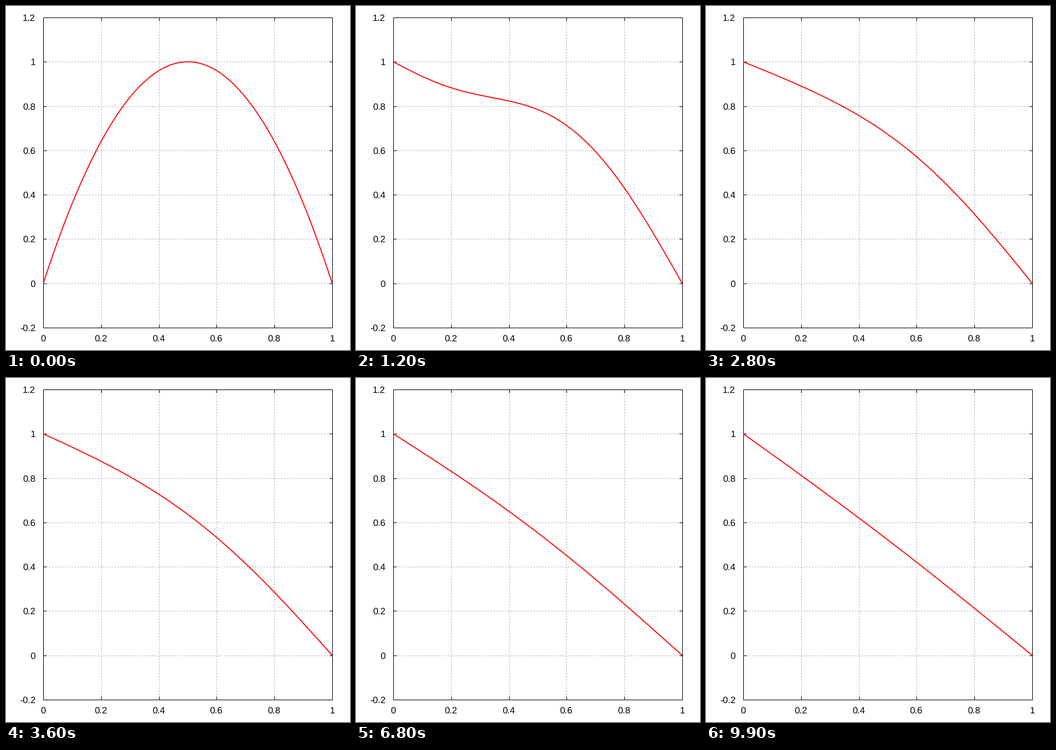
These frames come from a looping animation (600 by 600 pixels, 10 s). A matplotlib script:

```python
import numpy as np
import matplotlib.pyplot as plt
from matplotlib.animation import FuncAnimation

SIZE, DPI = 600, 100
FRAMES, INTERVAL = 100, 100
LEFT, RIGHT, TOP, BOTTOM = 65, 569, 20, 561
Y_MIN, Y_MAX = -0.2, 1.2
TICK = 5
DT = 0.003  # diffusion time per frame
PX = 72 / DPI

plt.rcParams["font.family"] = "Liberation Sans"
plt.rcParams["text.hinting"] = "none"


def to_x(v):
    return LEFT + (RIGHT - LEFT) * v


def to_y(v):
    return BOTTOM - (BOTTOM - TOP) * (v - Y_MIN) / (Y_MAX - Y_MIN)


x = np.linspace(0, 1, 101)
n = np.arange(1, 201)
# Sine series of the parabola minus the steady state 1 - x
coef = 32 * (n % 2) / (n * np.pi) ** 3 - 2 / (n * np.pi)
modes = np.sin(np.pi * np.outer(x, n))


def heat(step):
    if step == 0:
        return 4 * x * (1 - x)
    decay = np.exp(-(n * np.pi) ** 2 * DT * step)
    return 1 - x + modes @ (coef * decay)


fig = plt.figure(figsize=(SIZE / DPI, SIZE / DPI), dpi=DPI, facecolor="white")
ax = fig.add_axes([0, 0, 1, 1])
ax.set_xlim(0, SIZE)
ax.set_ylim(SIZE, 0)
ax.axis("off")


def hline(y, x0, x1, **style):
    """Fill pixels x0 to x1 of row y."""
    ax.plot([x0, x1 + 1], [y + 0.5] * 2, lw=PX, snap=False, **style)


def vline(x, y0, y1, **style):
    """Fill pixels y0 to y1 of column x."""
    ax.plot([x + 0.5] * 2, [y0, y1 + 1], lw=PX, snap=False, **style)


def label(px, py, value, ha):
    ax.text(px, py, f"{value:g}", fontsize=16 * PX, ha=ha, va="baseline")


grid = dict(color="#a0a0a0", dashes=(2, 3), dash_capstyle="butt", zorder=1)
solid = dict(color="black", solid_capstyle="butt", zorder=2)

for k in range(6):
    v = k / 5
    px = round(to_x(v))
    if 0 < k < 5:
        vline(px, TOP, BOTTOM, **grid)
    vline(px, TOP, TOP + TICK, **solid)
    vline(px, BOTTOM - TICK, BOTTOM, **solid)
    label(px, 585, v, "center")

for k in range(-1, 7):
    v = k / 5
    py = round(to_y(v))
    if -1 < k < 6:
        hline(py, LEFT, RIGHT, **grid)
    hline(py, LEFT, LEFT + TICK, **solid)
    hline(py, RIGHT - TICK, RIGHT, **solid)
    label(51.5, py + 6, v, "right")

for y in (TOP, BOTTOM):
    hline(y, LEFT, RIGHT, **solid)
for side in (LEFT, RIGHT):
    vline(side, TOP, BOTTOM, **solid)

curve, = ax.plot([], [], color="#ff0000", lw=1.75 * PX, snap=False,
                 solid_capstyle="butt", zorder=3)


def update(step):
    curve.set_data(to_x(x), to_y(heat(step)))
    return curve,


anim = FuncAnimation(fig, update, frames=FRAMES, interval=INTERVAL,
                     repeat=True, repeat_delay=0)
plt.show()
```
